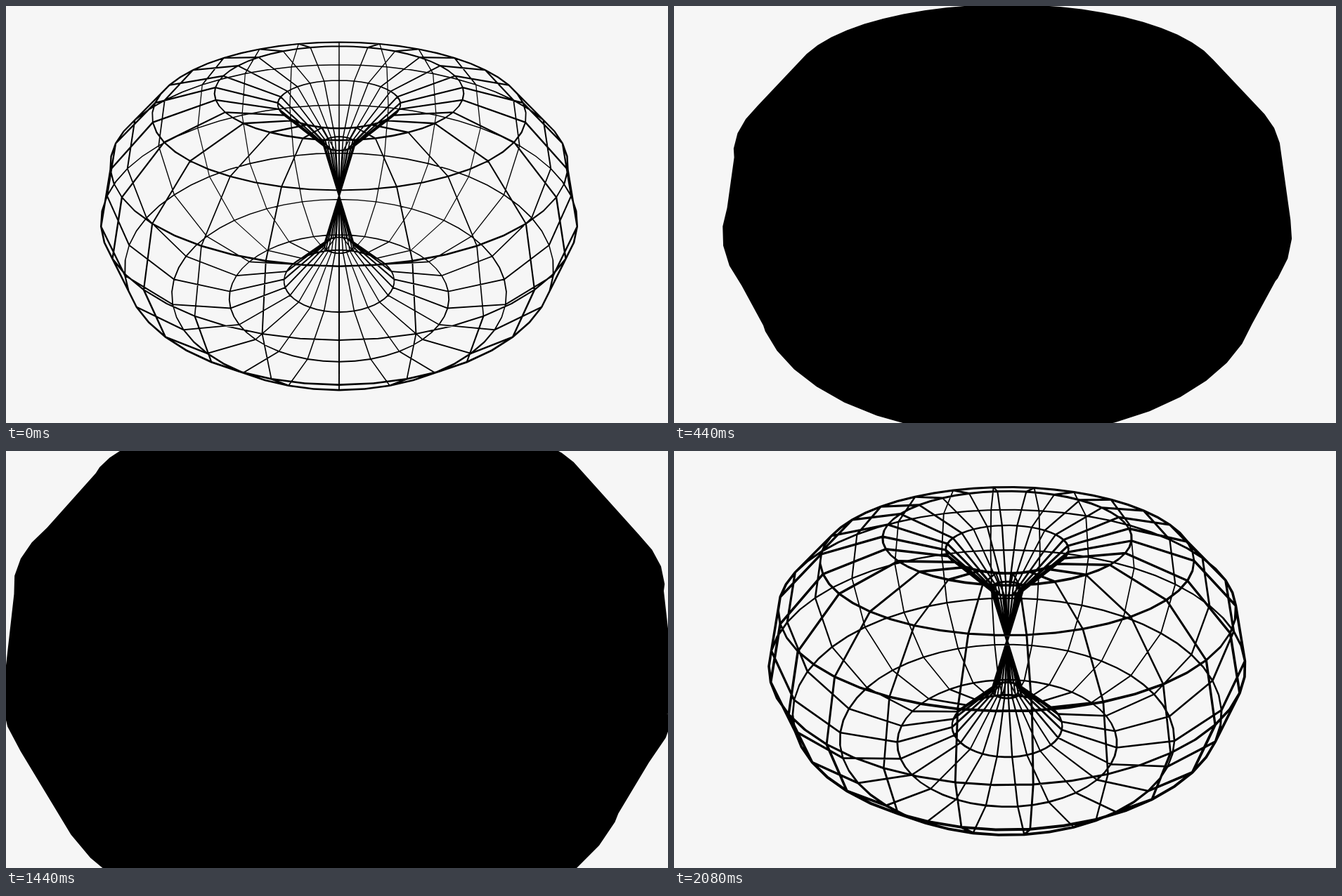
Recreate the animation shown at these times as an HTML page with a canvas. Size 942 by 594 pixels, loop 2.12 s.

```html
<!DOCTYPE html>
<html>
<head>
<meta charset="utf-8">
<style>
html, body { margin: 0; width: 100%; height: 100%; overflow: hidden; background: #f6f6f6; }
canvas { display: block; }
</style>
</head>
<body>
<canvas id="stage" width="942" height="594"></canvas>
<script>
const ctx = document.getElementById('stage').getContext('2d');
const { sin, cos, PI } = Math;
const STEP = 40, FRAMES = 53;
const TUBE = 12, RING = 48;
const TILT = 0.502, DIST = 7.73, FOCAL = 1276, CX = 474, CY = 270.5;

// Point on a horn torus, shifted along its normal, the tube and the ring
function project(v, a, normal, along, side) {
  const r = 1 - (1 + normal) * cos(v) + along * sin(v);
  const y = (1 + normal) * sin(v) + along * cos(v);
  const x = r * sin(a) + side * cos(a);
  const z = r * cos(a) - side * sin(a);
  const k = FOCAL / (DIST - z * cos(TILT) - y * sin(TILT));
  return [CX + x * k, CY - (y * cos(TILT) - z * sin(TILT)) * k];
}

function halfHull(points) {
  const out = [];
  for (const p of points) {
    while (out.length > 1) {
      const [a, b] = out.slice(-2);
      if ((b[0] - a[0]) * (p[1] - a[1]) - (b[1] - a[1]) * (p[0] - a[0]) > 0) break;
      out.pop();
    }
    out.push(p);
  }
  out.pop();
  return out;
}

function addHull(points) {
  points.sort((p, q) => p[0] - q[0] || p[1] - q[1]);
  const lower = halfHull(points);
  const hull = lower.concat(halfHull(points.reverse()));
  hull.forEach((p, i) => i ? ctx.lineTo(...p) : ctx.moveTo(...p));
  ctx.closePath();
}

// Diamond cross-section of a bar
const section = (v, a, w, along, side) => [
  project(v, a, w, 0, 0), project(v, a, -w, 0, 0),
  project(v, a, 0, along, side), project(v, a, 0, -along, -side)
];

function draw(frame) {
  const t = Math.min(frame, FRAMES - frame);
  const w = 0.007 + 0.757 * (1 - cos(PI * t / 34));
  const ringW = w * 0.85, ribW = w * 0.68;
  const spin = frame * 1.827 * PI / 180;
  const dv = 2 * PI / TUBE, da = 2 * PI / RING;

  ctx.fillStyle = '#f6f6f6';
  ctx.fillRect(0, 0, 942, 594);
  ctx.fillStyle = '#000';
  ctx.beginPath();
  for (let i = 0; i < TUBE; i++) {
    for (let j = 0; j < RING; j++) {
      const v = i * dv, a = spin + j * da;
      addHull([...section(v, a, w, ringW, 0), ...section(v, a + da, w, ringW, 0)]);
      if (j % 2 === 0) {
        addHull([...section(v, a, w, 0, ribW), ...section(v + dv, a, w, 0, ribW)]);
      }
    }
  }
  ctx.fill();
}

let shown = -1;
function tick() {
  const frame = Math.floor(performance.now() / STEP) % FRAMES;
  if (frame !== shown) draw(shown = frame);
  requestAnimationFrame(tick);
}
tick();
</script>
</body>
</html>
```
